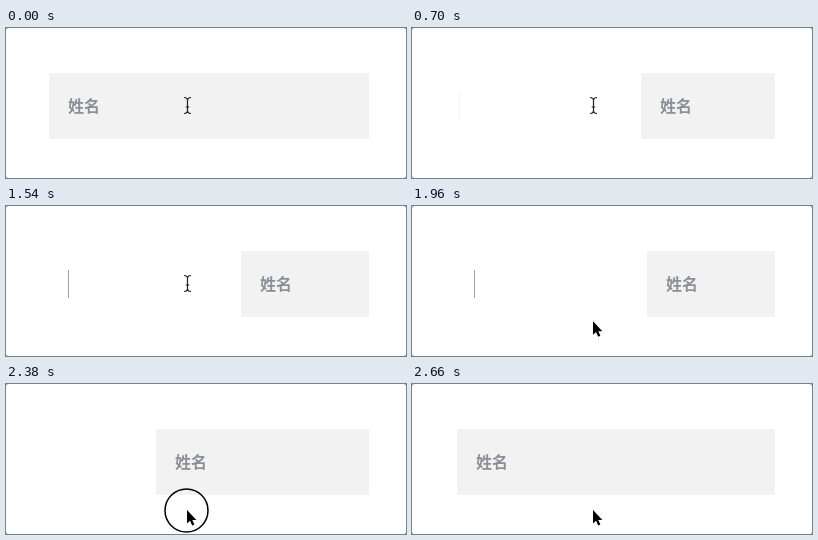
Animation, 400 px wide and 150 px high, one loop 2.73 s. Source, as an HTML page:

```html
<!DOCTYPE html>
<html lang="zh">
<head>
<meta charset="utf-8">
<style>
  html, body { margin: 0; width: 100%; height: 100%; overflow: hidden; background: #888; }
  svg { display: block; width: 400px; height: 150px; }
  text { font: bold 16px "Noto Sans CJK SC", "Noto Sans CJK", sans-serif; fill: #8a9098; }
</style>
</head>
<body>
<svg viewBox="0 0 400 150">
  <rect width="400" height="150" rx="2.5" fill="#fff"/>
  <rect id="caret" y="64" width="1" height="28" fill="#a0a0a0"/>
  <rect id="field" y="45" height="66" fill="#f2f2f2"/>
  <text id="label" y="84">姓名</text>
  <g id="pointer">
    <circle id="ring" cx="-.5" r="21.5" fill="none" stroke="#000" stroke-width="1.5"/>
    <path id="beam" transform="translate(.5 -4.5)" fill="none" stroke="#222" stroke-width="1.2"
      d="M-3.5-8Q0-8 0-5V5Q0 8-3.5 8M3.5-8Q0-8 0-5V5Q0 8 3.5 8M-1.8 1.5H1.8"/>
    <path id="arrow" d="M0-.5V13L3 10.3 5.2 15 7.4 14 5.3 9.5H9.4Z"
      fill="#000" stroke="#fff" stroke-width="1" paint-order="stroke"/>
  </g>
</svg>
<script>
const LOOP = 2730, STEP = 70, TAU = 70;
const FOCUS = 457, BLUR = 2339, TRAVEL = 192;
const [caret, field, label, pointer, ring, beam, arrow] =
  ['caret', 'field', 'label', 'pointer', 'ring', 'beam', 'arrow'].map(id => document.getElementById(id));

const decay = elapsed => Math.exp(-Math.max(0, elapsed) / TAU);
const clamp = v => Math.min(1, Math.max(0, v));
const within = (t, from, to) => t >= from && t < to;
const show = (el, on) => el.setAttribute('visibility', on ? 'visible' : 'hidden');

function draw(t) {
  // The label panel shrinks to the right on focus and grows back on blur.
  const shift = TRAVEL * (t < BLUR ? 1 - decay(t - FOCUS) : decay(t - BLUR));
  field.setAttribute('x', 43 + shift);
  field.setAttribute('width', 320 - shift);
  label.setAttribute('x', 62 + shift);

  // The caret slides in from the left, then blinks.
  caret.setAttribute('x', Math.round(62 - 15 * decay(t - 700)));
  caret.setAttribute('opacity', clamp((t - 690) / 100));
  show(caret, within(t, 690, 1045) || within(t, 1540, 2035));

  const y = 82 + 44.5 * (1 - (1 - clamp((t - 1785) / 465)) ** 3);
  pointer.setAttribute('transform', `translate(181 ${y})`);
  show(beam, y <= 111);
  show(arrow, y > 111);
  show(ring, within(t, 430, 560) || within(t, 2300, 2430));
}

function tick() {
  draw(Math.floor(performance.now() % LOOP / STEP) * STEP);
  requestAnimationFrame(tick);
}
tick();
</script>
</body>
</html>
```
